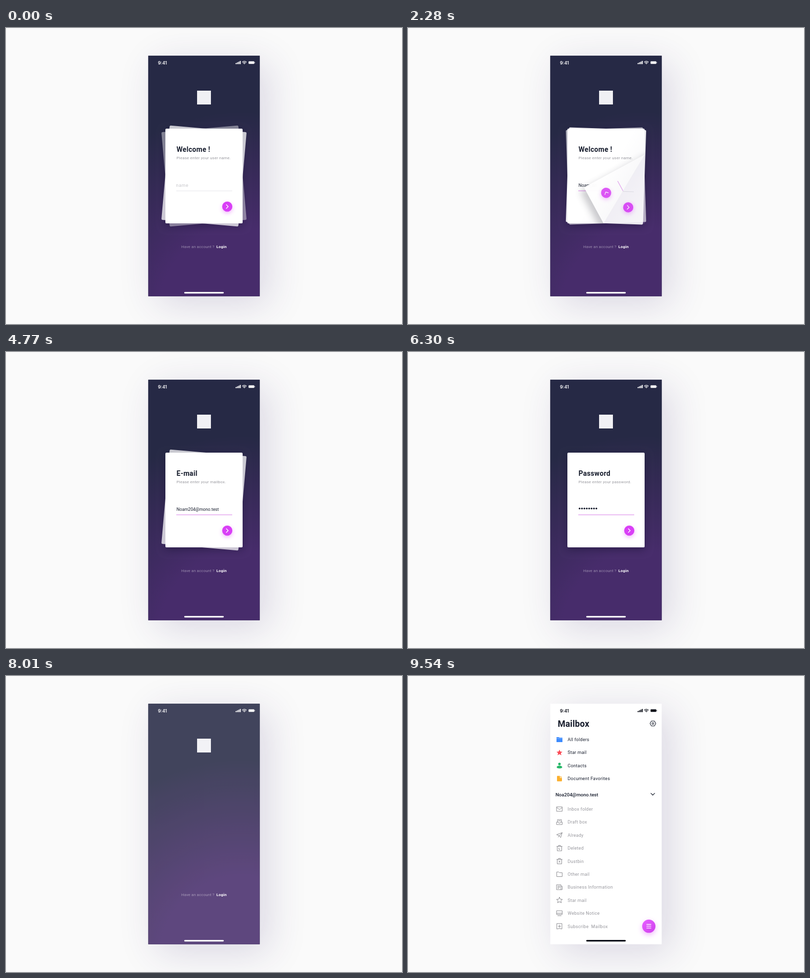
These frames come from a looping animation (800x600 px, 9.87 s). An HTML page with a canvas:

```html
<!DOCTYPE html>
<html lang="en">
<head>
<meta charset="utf-8">
<title>Mail sign-up</title>
<style>
  html, body { margin: 0; width: 100%; height: 100%; overflow: hidden; background: #fafafa; }
  canvas { display: block; width: 800px; height: 600px; }
</style>
</head>
<body>
<canvas id="stage"></canvas>
<script>
const LOOP = 9870;
const canvas = document.getElementById('stage');
const ctx = canvas.getContext('2d');
const dpr = window.devicePixelRatio || 1;
canvas.width = 800 * dpr;
canvas.height = 600 * dpr;

const SANS = 'Roboto, sans-serif';
const INK = '#161c2c', GREY = '#98989e', PINK = '#d93ff6';
const NAVY = '#262945', PURPLE = '#472c6b';

const CARD = { x: 322, y: 204, w: 156, h: 192 };
const CARDS = [
  { title: 'Welcome !', hint: 'Please enter your user name.', empty: 'name',
    value: 'Noam_lin', typeAt: 700, perChar: 75, peelAt: 2040 },
  { title: 'E-mail', hint: 'Please enter your mailbox.', empty: 'e-mail',
    value: 'Noam204@mono.test', typeAt: 3930, perChar: 43, peelAt: 4920 },
  { title: 'Password', hint: 'Please enter your password.', empty: 'password',
    value: '********', secret: true, typeAt: 5900, perChar: 46, peelAt: 6750 },
];
// Angle and opacity of each place in the pile, front first.
const PILE = [{ angle: 0, alpha: 1 }, { angle: 5, alpha: .75 }, { angle: -5, alpha: .42 }];
const PEEL_TIME = 785, PEEL_LENGTH = 232, PEEL_ANGLE = Math.atan2(28, 47);

const STAR = 'M0-6L1.8-2 6-1.7 2.8 1 3.8 5.3 0 3-3.8 5.3-2.8 1-6-1.7-1.8-2Z';
const BIN = 'M-5.5-3.5H5.5M-2-3.5V-5.5H2V-3.5M-4.5-3.5V5.5H4.5V-3.5';
const SHORTCUTS = [
  ['All folders', '#3d8bfd', 'M-6 5V-5H-1L0-4H6V5Z'],
  ['Star mail', '#fb4a55', STAR],
  ['Contacts', '#27b768', 'M-2.6-3.4a2.6 2.6 0 1 1 5.2 0a2.6 2.6 0 1 1-5.2 0M-5.5 3.4C-5.5-1 5.5-1 5.5 3.4C5.5 6.5-5.5 6.5-5.5 3.4Z'],
  ['Document Favorites', '#fbb02e', 'M-5-4.5Q-5-5.5-4-5.5H1V-1.5H5V4.5Q5 5.5 4 5.5H-4Q-5 5.5-5 4.5ZM2-5.5L5-2.5H2Z'],
];
const FOLDERS = [
  ['Inbox folder', 'M-5.5-4.5H5.5V4.5H-5.5ZM-5.5-3L0 1 5.5-3'],
  ['Draft box', 'M-4 0V-5H4V0M-5.5 0H-2.5L-1.5 2H1.5L2.5 0H5.5V5H-5.5ZM-2-2.5H2'],
  ['Already', 'M-5.5-1L5.5-5 2.5 5-.5 1.5ZM-.5 1.5L5.5-5M-.5 1.5L-2.5 4'],
  ['Deleted', BIN + 'M-1.2-.5V2.5H1'],
  ['Dustbin', BIN + 'M-1.6-.6L1.6 2.6M1.6-.6L-1.6 2.6'],
  ['Other mail', 'M-5.5 4.5V-4.5H-1.5L0-3H5.5V4.5Z'],
  ['Business Information', 'M-5.5-5H3V5H-5.5ZM3-2H5.5V5H3M-3.5-2.2H1M-3.5 0H1M-3.5 2.2H-1'],
  ['Star mail', STAR],
  ['Website Notice', 'M-5.5-5H5.5V2.5H-5.5ZM-5.5 0H5.5M-3.5 5H3.5'],
  ['Subscribe  Mailbox', 'M-5-5.5H5V5.5L0 4.5-5 5.5ZM0-2.5V2.5M-2.5 0H2.5'],
];

const clamp01 = v => Math.min(1, Math.max(0, v));
const lerp = (a, b, k) => a + (b - a) * k;
const ramp = (t, start, length) => clamp01((t - start) / length);
const smooth = k => k * k * (3 - 2 * k);

function layer(draw) {
  ctx.save();
  draw();
  ctx.restore();
}
function text(str, x, y, font, color, spacing = 0) {
  ctx.font = font;
  ctx.letterSpacing = spacing + 'px';
  ctx.fillStyle = color;
  ctx.fillText(str, x, y);
}
function box(x, y, w, h, r, fill) {
  ctx.beginPath();
  ctx.roundRect(x, y, w, h, r);
  ctx.fillStyle = fill;
  ctx.fill();
}
const fillScreen = fill => box(287.5, 56.3, 225, 487.5, 0, fill);
const fillSheet = fill => box(CARD.x, CARD.y, CARD.w, CARD.h, 2.5, fill);
function disc(x, y, r, fill) {
  ctx.beginPath();
  ctx.arc(x, y, r, 0, 7);
  ctx.fillStyle = fill;
  ctx.fill();
}
function stroke(path, x, y, color, width) {
  layer(() => {
    ctx.translate(x, y);
    ctx.strokeStyle = color;
    ctx.lineWidth = width;
    ctx.lineJoin = ctx.lineCap = 'round';
    ctx.stroke(new Path2D(path));
  });
}
function shadow(color, blur, dx, dy) {
  ctx.shadowColor = color;
  ctx.shadowBlur = blur * dpr;
  ctx.shadowOffsetX = dx * dpr;
  ctx.shadowOffsetY = dy * dpr;
}
function blend(gradient, ...colors) {
  colors.forEach((c, i) => gradient.addColorStop(i / (colors.length - 1), c));
  return gradient;
}
const linear = (x0, y0, x1, y1, ...colors) => blend(ctx.createLinearGradient(x0, y0, x1, y1), ...colors);
const radial = (x, y, r0, r1, ...colors) => blend(ctx.createRadialGradient(x, y, r0, x, y, r1), ...colors);

function drawPhone(base) {
  ctx.fillStyle = '#fafafa';
  ctx.fillRect(0, 0, 800, 600);
  layer(() => {
    shadow('rgba(62,40,110,.17)', 72, 17, 16);
    fillScreen(base);
  });
}

function drawStatus(color) {
  text('9:41', 307, 74.3, '600 9px Inter, sans-serif', color);
  for (let i = 0; i < 4; i++) box(463.8 + i * 2.8, 71 - i * 1.4, 2, 2.2 + i * 1.4, .5, color);
  stroke('M-4-1.2Q0-4.4 4-1.2M-2.3.7Q0-1.2 2.3.7', 481.5, 70.2, color, 1.3);
  disc(481.5, 72.3, 1, color);
  box(490, 67.6, 11.6, 5.2, 1.2, color);
  box(502.2, 69.2, .9, 2, .4, color);
  box(360, 535, 80, 3.2, 1.6, color);
}

function drawCard(card, t) {
  fillSheet('#fff');
  text(card.title, 344.5, 250.5, `bold 14px ${SANS}`, INK, .3);
  text(card.hint, 344.5, 265.5, `8px ${SANS}`, GREY, .23);

  const typed = Math.floor((t - card.typeAt) / card.perChar);
  if (typed < 1) {
    text(card.empty, 343.5, 321.5, `9px ${SANS}`, '#c6c6cb', .7);
  } else if (card.secret) {
    for (let i = 0; i < Math.min(typed, card.value.length); i++) disc(346.6 + i * 4.85, 317.3, 1.75, INK);
  } else {
    text(card.value.slice(0, typed), 344.5, 322.3, `8.7px ${SANS}`, INK);
  }
  box(344, 329.7, 113, .9, 0, '#dcdce1');
  box(344, 329.6, 113 * smooth(ramp(t, card.typeAt, 330)), 1, 0, '#e58af3');

  layer(() => {
    shadow('rgba(217,63,246,.4)', 9, 0, 3);
    disc(447, 362, 10.3, PINK);
  });
  stroke('M-1.6-3.8L2.2 0-1.6 3.8', 446.7, 362, '#fff', 1.4);
}

// Runs draw in axes where x = 0 is the fold and x grows toward the lifted corner.
function alongFold(x, y, draw) {
  ctx.translate(x, y);
  ctx.rotate(PEEL_ANGLE);
  draw();
  ctx.rotate(-PEEL_ANGLE);
  ctx.translate(-x, -y);
}
function clipFlatSide(x, y) {
  alongFold(x, y, () => {
    ctx.beginPath();
    ctx.rect(-900, -900, 900, 1800);
  });
  ctx.clip();
}

function drawPeel(card, t, progress) {
  const lift = progress * PEEL_LENGTH;
  const x = CARD.x + CARD.w - lift * Math.cos(PEEL_ANGLE);
  const y = CARD.y + CARD.h - lift * Math.sin(PEEL_ANGLE);

  layer(() => {
    clipFlatSide(x, y);
    drawCard(card, t);
  });
  if (!progress) return;

  layer(() => {
    ctx.beginPath();
    ctx.roundRect(CARD.x, CARD.y, CARD.w, CARD.h, 2.5);
    ctx.clip();
    if (card !== CARDS[2]) alongFold(x, y, () => {
      ctx.fillStyle = linear(0, 0, 90, 0, 'rgba(95,75,160,.05)', 'rgba(95,75,160,0)');
      ctx.fillRect(0, -400, 90, 800);
    });
    clipFlatSide(x, y);
    alongFold(x, y, () => ctx.scale(-1, 1));
    ctx.globalAlpha = .84;
    layer(() => {
      shadow('rgba(50,50,65,.3)', 14, -8, 8);
      fillSheet('#fff');
    });
    drawCard(card, t);
    alongFold(x, y, () => {
      ctx.fillStyle = linear(0, 0, 45, 0, 'rgba(110,100,140,.04)', 'rgba(110,100,140,0)');
      ctx.fillRect(0, -400, 45, 800);
    });
  });
}

function pilePose(index, t) {
  let { angle, alpha } = PILE[index];
  for (let k = 0; k < index; k++) {
    const gather = smooth(ramp(t, CARDS[k].peelAt, 420));
    const spread = smooth(ramp(t, CARDS[k].peelAt + 700, 800));
    const next = PILE[index - k - 1];
    angle = lerp(angle * (1 - gather), next.angle, spread);
    alpha = lerp(alpha, next.alpha, gather);
  }
  return { angle, alpha };
}

function drawSignUp(t) {
  fillScreen(radial(475, 570, 165, 400, PURPLE, '#372a58', NAVY));
  box(386, 127, 28, 28, 0, '#f0f0f4');
  text('Have an account ?', 354, 445.5, `8px ${SANS}`, 'rgba(255,255,255,.45)', .1);
  text('Login', 425, 445.5, `bold 8px ${SANS}`, '#fff', .2);

  const last = ramp(t, CARDS[2].peelAt, PEEL_TIME);
  if (last === 1) return;

  // Shade around the upright card, kept outside its own area.
  layer(() => {
    ctx.beginPath();
    ctx.rect(288, 57, 224, 486);
    ctx.roundRect(CARD.x, CARD.y, CARD.w, CARD.h, 2.5);
    ctx.clip('evenodd');
    ctx.globalAlpha = 1 - last;
    shadow('rgba(18,14,45,.42)', 16, 0, 5);
    fillSheet('#fff');
  });
  for (let i = 2; i > 0; i--) {
    const { angle, alpha } = pilePose(i, t);
    if (t >= CARDS[i].peelAt || angle === 0) continue;
    layer(() => {
      ctx.globalAlpha = alpha;
      ctx.translate(400, 300);
      ctx.rotate(angle * Math.PI / 180);
      ctx.translate(-400, -300);
      drawCard(CARDS[i], t);
    });
  }
  for (let i = 2; i >= 0; i--) {
    const progress = ramp(t, CARDS[i].peelAt, PEEL_TIME);
    if (pilePose(i, t).angle === 0 && progress < 1) drawPeel(CARDS[i], t, progress);
  }
}

// Each row rises and fades in a little after the one above it.
function row(index, t, draw) {
  const k = ramp(t, 8250 + index * 30, 700);
  const shown = 1 - (1 - k) ** 2;
  if (!shown) return;
  layer(() => {
    ctx.globalAlpha = shown;
    ctx.translate(0, 26.5 * (1 - shown));
    draw(shown);
  });
}

function drawMailbox(t) {
  row(0, t, () => {
    text('Mailbox', 302.5, 103, `bold 17.5px ${SANS}`, INK, .2);
    stroke('M-5.8 0L-3-5H3L5.8 0 3 5H-3ZM-1.8 0a1.8 1.8 0 1 0 3.6 0a1.8 1.8 0 1 0-3.6 0', 494.8, 96.3, INK, 1.1);
  });
  SHORTCUTS.forEach(([label, color, icon], i) => row(i + 1, t, () => {
    const y = 129 + i * 26.35;
    text(label, 322.5, y + 3, `9px ${SANS}`, INK, .3);
    ctx.translate(306, y);
    ctx.fillStyle = color;
    ctx.fill(new Path2D(icon));
    if (i === 0) box(-6, -2.6, 12, .8, 0, '#9cc6ff');
  }));
  row(5, t, () => {
    text('Noa204@mono.test', 298, 243.5, `500 9.6px ${SANS}`, INK);
    stroke('M-3.8-1.9L0 1.9 3.8-1.9', 494.5, 239.6, INK, 1.2);
  });
  FOLDERS.forEach(([label, icon], i) => row(i + 6, t, () => {
    const y = 269.7 + i * 26.4;
    text(label, 322.5, y + 3.2, `9px ${SANS}`, GREY, .3);
    stroke(icon, 306, y, '#85858b', .95);
  }));
  row(19, t, shown => {
    ctx.translate(486.5, 507.2);
    ctx.scale(shown, shown);
    layer(() => {
      shadow('rgba(217,63,246,.38)', 11, 0, 4);
      disc(0, 0, 13.4, linear(-10, -10, 10, 10, '#e45cff', '#d142ee'));
    });
    stroke('M-4.3-3.7H4.3M-4.3 0H4.3M-4.3 3.7H4.3', 0, 0, '#fff', 1.3);
  });
}

function draw(t) {
  ctx.setTransform(dpr, 0, 0, dpr, 0, 0);
  const white = ramp(t, 7740, 770) ** 2;
  drawPhone(white < 1 ? NAVY : '#fff');
  if (white < 1) {
    drawSignUp(t);
    layer(() => {
      ctx.globalAlpha = white;
      fillScreen('#fff');
    });
    drawStatus('#fff');
  }
  layer(() => {
    ctx.globalAlpha = white * white;
    drawStatus('#0c0f18');
  });
  drawMailbox(t);
}

const start = performance.now();
function frame() {
  draw((performance.now() - start) % LOOP);
  requestAnimationFrame(frame);
}
frame();
</script>
</body>
</html>
```
